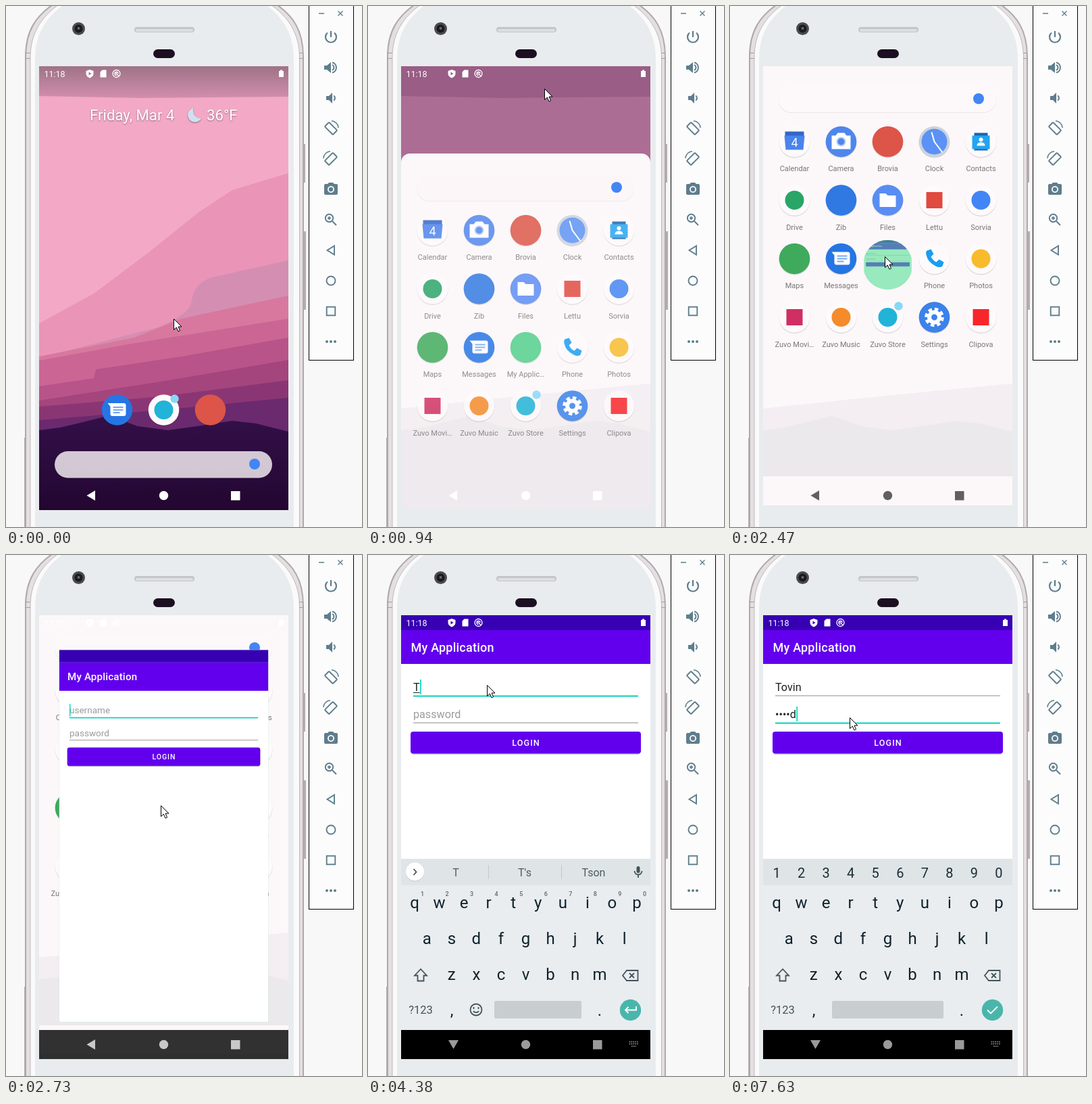
Write an HTML page that moves like this. It is 527 px wide and 770 px high and loops after 8000 ms.

```html
<!DOCTYPE html>
<html lang="en">
<head>
<meta charset="utf-8">
<title>Phone login demo</title>
<style>
  html, body { margin: 0; width: 100%; height: 100%; overflow: hidden; background: #f8f8f8; }
  svg { display: block; width: 527px; height: 770px; font-family: Roboto, sans-serif; }
  text { white-space: pre; }
  .mid { text-anchor: middle; }
  .line { fill: none; stroke-width: 1.8; }
  #tools { fill: none; stroke: #5f7d8c; stroke-width: 1.9; }
  #tools .solid { fill: #5f7d8c; stroke: none; }
  #date { font-size: 22px; letter-spacing: .08px; fill: #fff; filter: drop-shadow(0 1px 1px #0006); }
  #grid text { font-size: 11px; fill: #777; }
  #fields { font-size: 16.16px; }
  #keys, #symbols { font-size: 24px; fill: #10222b; }
  #keys .small { font-size: 9px; font-weight: 500; fill: #5b686f; }
  #digits { font-size: 20px; fill: #1b2d35; }
  #words { font-size: 16px; fill: #4f5d64; }
</style>
</head>
<body>
<svg viewBox="0 0 527 770">
  <defs>
    <clipPath id="screen"><rect x="49" y="89" width="369" height="656"/></clipPath>
    <clipPath id="reveal"><circle id="hole" cx="233.5"/></clipPath>
    <linearGradient id="shade" x2="0" y2="1">
      <stop stop-color="#404040" stop-opacity=".36"/><stop offset="1" stop-color="#404040" stop-opacity="0"/>
    </linearGradient>
    <linearGradient id="hill" x2="0" y2="1"><stop stop-color="#331049"/><stop offset="1" stop-color="#230630"/></linearGradient>
  </defs>

  <!-- phone body -->
  <g fill="#b5acb0">
    <rect x="440" y="204" width="3" height="57"/><rect x="440" y="333" width="4" height="116"/><rect x="27" y="638" width="3" height="132"/>
  </g>
  <path d="M29 780V75C29 36 45 14 72-4H398C425 14 440 36 440 75V780z" fill="#e4dfe1" stroke="#b0a8ac" stroke-width="2"/>
  <path d="M36 780V76C36 42 51 16 81-4H389C419 16 434.500 42 434.500 76V780z" fill="#fafafa" stroke="#bfb8bc"/>
  <path d="M43 780V78C43 45 56 18 88-4H382C413 18 426 45 426 78V780z" fill="#e9ecee"/>
  <path d="M29 69.500h7m-7 8h7M434 69.500h6m-6 8h6" stroke="#a59da1"/>
  <circle cx="107.500" cy="33.500" r="9.500" fill="#4a4b4d"/><circle cx="107.500" cy="33.500" r="6" fill="#1b1b1d"/><circle cx="107.500" cy="33" r="2" fill="#68696b"/>
  <rect x="190" y="31" width="89" height="8" rx="4" fill="#c3c6c8"/><rect x="192" y="34" width="85" height="4" rx="2" fill="#dcdee0"/>
  <rect x="218" y="64" width="32" height="13" rx="6.500" fill="#1c0f22"/>

  <!-- emulator panel -->
  <rect x="448.500" y="-2" width="66" height="525.500" fill="#fcfcfc" stroke="#000"/>
  <path d="M463 11h8M491.500 7.500l7 7m0-7l-7 7" stroke="#5f7d8c" stroke-width="1.400"/>
  <g id="tools"></g>

  <g clip-path="url(#screen)">
    <g id="wallpaper"></g>
    <rect id="statusShade" x="49" y="89" width="369" height="48" fill="url(#shade)"/>
    <g id="home">
      <g id="date">
        <text x="124" y="169">Friday, Mar 4</text><text x="297" y="169">36°F</text>
        <path d="M277 151a10.500 10.500 0 1 0 12 15q-13 0-12-15z" fill="#cfe0f3"/>
      </g>
      <g id="dock"></g>
    </g>
    <rect id="scrim" x="49" y="89" width="369" height="656" fill="#4a1a50"/>
    <rect id="sheet" x="49" width="369" height="1300" fill="#fcf7f9"/>
    <g id="veil"></g>
    <g id="drawer">
      <rect id="pillEdge" x="72" y="119" width="322" height="39" rx="19.500" fill="#ddd7da"/>
      <rect id="pill" x="72" y="118" width="322" height="39.500" rx="19.700" fill="#fdf8fa"/>
      <circle cx="368" cy="137" r="8" fill="#4285f4"/>
      <g id="grid"></g>
    </g>
    <g id="navStrip">
      <rect x="49" y="695" width="369" height="43" fill="#fcf7f9"/><rect x="49" y="738" width="369" height="7" fill="#e9ecee"/>
    </g>

    <g id="launch" clip-path="url(#reveal)">
      <rect x="49" y="89" width="369" height="656" fill="#4fd98e"/>
      <g id="app">
        <rect x="49" y="89" width="369" height="656" fill="#fff"/>
        <rect x="49" y="89" width="369" height="22" fill="#3700b3"/>
        <rect x="49" y="111" width="369" height="50" fill="#6200ee"/>
        <text x="63.500" y="142.500" fill="#fff" font-size="18" font-weight="500" letter-spacing=".225">My Application</text>
        <g id="fields">
          <text id="user" x="67" y="201"></text><text id="pass" x="67" y="241"></text>
          <rect id="userLine" x="67" width="333"/><rect id="passLine" x="67" width="333"/>
          <path id="composing" stroke="#222"/>
          <rect id="caret" width="1.700" height="22" fill="#03dac5"/>
        </g>
        <rect x="64" y="263" width="339" height="32" rx="4" fill="#0003"/>
        <rect x="63" y="261" width="341" height="32.500" rx="4" fill="#6200ee"/>
        <text class="mid" x="234" y="282" fill="#fff" font-size="12.570" font-weight="500" letter-spacing="1.120">LOGIN</text>
      </g>
    </g>

    <g id="keyboard">
      <rect x="49" y="449" width="369" height="260" fill="#e9edf0"/><rect x="49" y="449" width="369" height="39" fill="#dfe4e7"/>
      <g id="suggest">
        <circle cx="69.500" cy="469" r="13.500" fill="#0002"/><circle cx="69.500" cy="468" r="13.500" fill="#fff"/>
        <path d="M67.500 464l4 4.500-4 4.500" class="line" stroke="#44535a"/>
        <path d="M178.500 458v21M286.500 458v21" stroke="#c3cacd"/>
        <g id="words" class="mid"><text x="130" y="475"></text><text x="232" y="475"></text><text x="334" y="475"></text></g>
        <rect x="397.500" y="460" width="5" height="10" rx="2.500" fill="#44535a"/>
        <path d="M394.500 467a5.500 5.500 0 0 0 11 0M400 473v4" class="line" stroke="#44535a"/>
      </g>
      <g id="digits" class="mid"></g>
      <g id="keys" class="mid"></g>
      <text class="mid" x="78" y="678" font-size="16.500" fill="#43535b">?123</text>
      <g id="symbols" class="mid"><text x="124" y="681">,</text><text x="343" y="681">.</text></g>
      <rect id="space" y="659" height="26" rx="2" fill="#c8cdd0"/>
      <g class="line" stroke="#44535a">
        <path d="M78 612l-9 9.500h4.500v8h9v-8h4.500z"/>
        <path d="M377 621.500l6-7.500h16.500v15h-16.500zM387 618l7 7m0-7l-7 7"/>
        <path id="smiley" d="M168.500 672a8.500 8.500 0 1 0-17 0a8.500 8.500 0 1 0 17 0M156 674a4.500 4 0 0 0 8 0M156.500 668v3M163.500 668v3"/>
      </g>
      <circle cx="388.500" cy="672.500" r="15.700" fill="#4ab6ab"/>
      <path id="action" class="line" stroke="#fff"/>
    </g>

    <rect id="navBack" x="49" y="702" width="369" height="43"/>
    <g id="nav">
      <path id="back"/><circle cx="233.500" cy="723.500" r="6.700"/><rect x="333" y="717" width="13.500" height="13.500"/>
      <path id="hide" d="M386.500 719.500h14M386.500 722.500h14M390 726h7" stroke="#9a9a9a" stroke-width="1.500" stroke-dasharray="1.700 1.200"/>
    </g>
    <g id="status" fill="#fff" fill-rule="evenodd">
      <text x="56.500" y="105" font-size="12.500">11:18</text>
      <path d="M124 94l5.500 2v4c0 3-2 5-5.500 6.500-3.500-1.500-5.500-3.500-5.500-6.500v-4zM122.500 97.500v5l4-2.500zM142.500 94.500h6v11h-9v-8zM404 96h2v-1.500h3v1.500h2v9h-7z"/>
      <path d="M169 100a5.500 5.500 0 1 0-11 0a5.500 5.500 0 1 0 11 0M166 100a2.500 2.500 0 1 0-2.500 2.500M161 97.500l6 6" fill="none" stroke="#fff" stroke-width="1.300"/>
    </g>
  </g>
  <path id="pointer" d="M.5.5V16.500L4.300 13l2.700 6 2.600-1.200L7 12h5z" fill="#fff" stroke="#000"/>
</svg>

<script>
const $ = id => document.getElementById(id);
const set = (id, attrs) => { for (const k in attrs) $(id).setAttribute(k, attrs[k]); };
const fill = (id, parts) => { $(id).innerHTML = parts.join(''); };
const show = (id, on) => set(id, { opacity: +on });
const clamp = v => Math.max(0, Math.min(1, v));
const label = (s, x, y, cls = '') => `<text x="${x}" y="${y}" class="${cls}">${s}</text>`;

// Emulator buttons, on a 24-unit grid
const rotate = '<rect x="7.500" y="3.500" width="9" height="17" rx="1" transform="rotate(-45 12 12)"/><path d="M13 .8A11 11 0 0 1 23.200 11" stroke-width="1.500"/>';
fill('tools', [
  '<path d="M12 3v9M7 5.500A8 8 0 1 0 17 5.500" stroke-width="2.200"/>',
  '<path class="solid" d="M2 9v6h4l6 5V4L6 9z"/><path d="M14 8a4.500 4.500 0 0 1 0 8M14 4.500a7.700 7.700 0 0 1 0 15"/>',
  '<path class="solid" d="M5 9v6h4l5 5V4L9 9z"/><path d="M16 8.500a4 4 0 0 1 0 7"/>',
  rotate,
  `<g transform="matrix(-1 0 0 1 24 0)">${rotate}</g>`,
  '<path class="solid" fill-rule="evenodd" d="M9 2L7.200 4H4q-2 0-2 2V18q0 2 2 2H20q2 0 2-2V6q0-2-2-2H16.800L15 2zM12 7a5 5 0 1 0 .01 0z"/><circle class="solid" cx="12" cy="12" r="3.200"/>',
  '<circle cx="9.500" cy="9.500" r="5.700"/><path d="M14 14l6 6M9.500 7v5M7 9.500h5"/>',
  '<path d="M17 5.500v13L6.500 12z"/>',
  '<circle cx="12" cy="12" r="6.500"/>',
  '<rect x="5.700" y="5.700" width="12.600" height="12.600"/>',
  [6, 12, 18].map(x => `<circle class="solid" cx="${x}" cy="12" r="2"/>`).join('')
].map((s, i) => `<g transform="translate(469 ${34 + 45 * i})">${s}</g>`));

// Each band reaches from its top edge down to the bottom of the screen
const band = ([color, edge]) => `<path fill="${color}" d="M${edge}V745H49z"/>`;
const hills = '49 627L80 623 110 616 150 606 165 610 195 621 240 627 290 620 335 613 370 617 418 629';
fill('wallpaper', [
  ['#d38fae', '49 89L418 89'],
  ['#f3a9c6', '49 133L200 136 418 134'],
  ['#ea94b8', '49 469L130 425 210 365 285 305 335 272 418 247'],
  ['#d48eb1', '49 520L225 475Q274 455 275 435 278 410 305 401L418 376'],
  ['#d8789f', '49 518L190 490 260 462 418 428'],
  ['#cb6694', '49 524L180 500 418 462'],
  ['#b9548a', '49 562L130 550 133 537 260 518 418 490'],
  ['#a4457d', '49 583L230 555 418 523'],
  ['#8b3674', '49 592L230 577 418 553'],
  ['#6b2a6e', '49 612L230 597 418 579'],
  ['url(#hill)', hills]
].map(band));
fill('veil', [['#f4eef2', '49 595L230 576 418 558'], ['#ece9ed', hills]].map(band));

// Launcher icons, centred on 0,0
const PAPER = '#fefafc';
const disc = (color, inner = '') => `<circle cy="1" r="23" fill="#0002"/><circle r="22.800" fill="${color}"/>${inner}`;
const dot = color => disc(PAPER, `<circle r="14" fill="${color}"/>`);
const tile = color => disc(PAPER, `<rect x="-12" y="-12" width="24" height="24" fill="${color}"/>`);
const store = dot('#21b3d8') + '<circle cx="16" cy="-16.500" r="6.200" fill="#85d9f7"/>';
const browser = disc('#dc5548');
const messages = disc('#2675e4', '<path d="M-14-10H10q3 0 3 3V6q0 3-3 3H-7q-3 0-3-3V-5z" fill="#fff"/><path d="M-6-4H9M-6 0H9M-6 4H4" stroke="#74a8f3" stroke-width="2"/>');
const apps = [
  ['Calendar', disc(PAPER, '<path d="M-14-15H14V-6H-14z" fill="#3267c9"/><path d="M-15-9H15L13 12H-13z" fill="#4b83ec"/><text class="mid" y="7" style="font-size:18px;fill:#fff">4</text>')],
  ['Camera', disc('#4f86ec', '<path d="M-14-9h6l3-4H5l3 4h6V11H-14z" fill="#fff"/><circle cy="0" r="7" fill="#b7cdf6"/><circle r="5" fill="#4f86ec"/>')],
  ['Brovia', browser],
  ['Clock', disc('#cbd2de', '<circle r="19" fill="#5c92f4"/><path d="M-4-14L0 0 12 16" fill="none" stroke="#fff" stroke-width="2"/>')],
  ['Contacts', disc(PAPER, '<path d="M-10-13H10V13H-10z" fill="#1565b5"/><path d="M-13-9H13V11H-13z" fill="#24a4f0"/><circle cy="-3" r="3" fill="#fff"/><path d="M-6 6q0-5 6-5t6 5z" fill="#fff"/>')],
  ['Drive', dot('#29a567')],
  ['Zib', disc('#3079e2')],
  ['Files', disc('#5a8df3', '<path d="M-12-10h9l3 3H12V10H-12z" fill="#fff"/>')],
  ['Lettu', tile('#e04a3f')],
  ['Sorvia', dot('#4285f4')],
  ['Maps', disc('#3faa5c')],
  ['Messages', messages],
  ['My Applic…', disc('#4fd08a')],
  ['Phone', disc(PAPER, '<path d="M-11-12l6-2 4 7-4 4q3 6 8 8l4-4 7 4-2 6q-4 3-10 0-12-6-14-17-1-4 1-6z" fill="#1a9df0"/>')],
  ['Photos', dot('#f7bb2c')],
  ['Zuvo Movi…', tile('#cf2f62')],
  ['Zuvo Music', dot('#f58b2a')],
  ['Zuvo Store', store],
  ['Settings', disc('#3b82ea', '<circle r="7.500" fill="none" stroke="#fff" stroke-width="6"/><circle r="12" fill="none" stroke="#fff" stroke-width="4.500" stroke-dasharray="5.400 4.025"/>')],
  ['Clipova', tile('#f8262a')]
];
const place = (icon, x, y) => `<g transform="translate(${x} ${y})">${icon}</g>`;
fill('grid', apps.map(([name, icon], i) => {
  const x = 95.5 + 69 * (i % 5), y = 200.5 + 86.5 * Math.floor(i / 5);
  return place(icon, x, y) + label(name, x, y + 43.5, 'mid');
}));
fill('dock', [messages, store, browser].map((icon, i) => place(icon, 164.5 + 69 * i, 597)));
const tappedLabel = $('grid').querySelectorAll(':scope > text')[12];

// Keyboard
const column = i => 69 + 36.55 * i;
const digits = [...'1234567890'];
fill('digits', digits.map((d, i) => label(d, column(i), 476.5)));
fill('keys', [['qwertyuiop', 0, 522], ['asdfghjkl', .5, 575], ['zxcvbnm', 1.5, 628]].flatMap(
  ([row, shift, y]) => [...row].map((c, i) => label(c, column(i + shift), y))
).concat('<g id="hints">', digits.map((d, i) => label(d, column(i) + 11.5, 504, 'small')), '</g>'));

// Timeline: the picture only changes at these moments
const LOOP = 8000;
const TICKS = [0, 150, 300, 700, 820, 940, 1060, 1180, 1320, 1460, 1600, 1740, 1890, 2040,
  2470, 2590, 2710, 2830, 2970, 3110, 3260, 3400, 3550, 3670, 3810, 3950, 4080,
  4380, 4550, 4720, 4880, 5050, 5660, 5940, 6060, 6180, 6300, 6460, 6620, 6780, 7060, 7210, 7480, 7630];
const POINTER = [[0, 248, 462], [150, 247, 475], [300, 247, 489], [700, 234, 435], [940, 261, 122], [1180, 261, 122],
  [1740, 236, 404], [1890, 232, 385], [2040, 229, 370], [2970, 229, 370], [3400, 200, 262], [3670, 176, 192],
  [5660, 176, 192], [6180, 177, 240]];
const DRAWER = [[300, 540], [700, 526], [940, 131], [1060, 42], [1180, 8], [1320, 0]];
const LAUNCH = [[2470, 0], [2590, .35], [2710, .8], [2830, 1]];
const KEYBOARD = [[3670, 255], [3810, 150], [3950, 35], [4080, 0]];
const USER_KEYS = [4380, 4550, 4720, 4880, 5050];
const PASS_KEYS = [6780, 7060, 7210, 7480, 7630];
const USER = 'Tovin', PASS = 'solid';

function at(t, track) {
  const i = track.findIndex(k => k[0] > t);
  if (i <= 0) return track[i ? track.length - 1 : 0].slice(1);
  const a = track[i - 1], b = track[i], f = (t - a[0]) / (b[0] - a[0]);
  return a.slice(1).map((v, j) => v + (b[j + 1] - v) * f);
}
const typed = (t, times) => times.filter(k => k <= t).length;

function drawLauncher(t, launched) {
  const [offset] = at(t, DRAWER), open = 1 - offset / 540;
  set('home', { transform: `translate(0 ${(offset - 540) * .2})`, opacity: clamp(1 - open * 3) });
  show('statusShade', clamp(1 - open * 1.3));
  show('scrim', open * .55);
  set('sheet', { y: 87 + offset, rx: Math.min(13, offset / 5), opacity: clamp(open * 3.5) });
  show('veil', clamp(open * 3 - 1.4));
  set('drawer', { transform: `translate(0 ${offset})` });
  show('pillEdge', open);
  show('pill', .8 + .2 * open);
  show('grid', clamp((open - .2) * 1.5));
  show('navStrip', open > .99);
  tappedLabel.setAttribute('opacity', +(t < 2470));
  show('status', open < .9 || launched > .5);
  return open;
}

function drawField(id, line, y, value, hint, focused) {
  $(id).textContent = value || hint;
  set(id, { fill: value ? '#202020' : '#9b9b9b' });
  set(line, { y, height: focused ? 2 : 1, fill: focused ? '#03d0bd' : '#8c8c8c' });
}

function drawForm(t, onPass) {
  const name = USER.slice(0, typed(t, USER_KEYS)), count = typed(t, PASS_KEYS);
  const secret = count ? '•'.repeat(count - 1) + PASS[count - 1] : '';
  drawField('user', 'userLine', 207.5, name, 'username', !onPass);
  drawField('pass', 'passLine', 247.5, secret, 'password', onPass);
  const width = id => $(id).getComputedTextLength();
  const end = onPass ? (secret && width('pass')) : (name && width('user'));
  set('caret', { x: 67 + (+end || 0) + (end ? .4 : 0), y: onPass ? 224 : 184 });
  show('caret', t < 5660 || t >= 5940);
  set('composing', { d: `M67 203.500h${name ? width('user') : 0}` });
  show('composing', name && !onPass);
  [...$('words').children].forEach((w, i) => w.textContent = name && name + ['', "'s", 'son'][i]);
}

function drawKeyboard(t, onPass) {
  set('keyboard', { transform: `translate(0 ${at(t, KEYBOARD)[0]})`, opacity: +(t >= 3810) });
  show('suggest', !onPass);
  show('hints', !onPass);
  show('smiley', !onPass);
  show('digits', onPass);
  set('space', { x: onPass ? 151 : 187, width: onPass ? 165 : 129 });
  set('action', { d: onPass ? 'M381 672.500l5 5 10-10' : 'M397 667v5.500h-16m4.500-4.500l-4.500 4.500 4.500 4.500' });
}

function draw() {
  const now = performance.now() % LOOP, t = TICKS.findLast(k => k <= now);
  const [q] = at(t, LAUNCH), onPass = t >= 6300, typing = t >= 3810;
  const open = drawLauncher(t, q);

  set('launch', {
    transform: `translate(${198.5 - 149.5 * q} ${346 - 257 * q}) scale(${.19 + .81 * q}) translate(-49 -89)`,
    opacity: +(t >= 2470)
  });
  set('hole', { cy: 281 + 136 * q, r: 193 + 300 * q });
  show('app', clamp(.42 + q * 1.5));
  drawForm(t, onPass);
  drawKeyboard(t, onPass);

  show('navBack', q);
  set('nav', { fill: typing ? '#9a9a9a' : q > .5 ? '#c8c8c8' : open > .9 ? '#606060' : '#fff' });
  set('back', { d: typing ? 'M119 717h15l-7.500 13z' : 'M132 716v15l-12.500-7.500z' });
  show('hide', typing);
  set('pointer', { transform: `translate(${at(t, POINTER)})` });
  requestAnimationFrame(draw);
}
draw();
</script>
</body>
</html>
```
